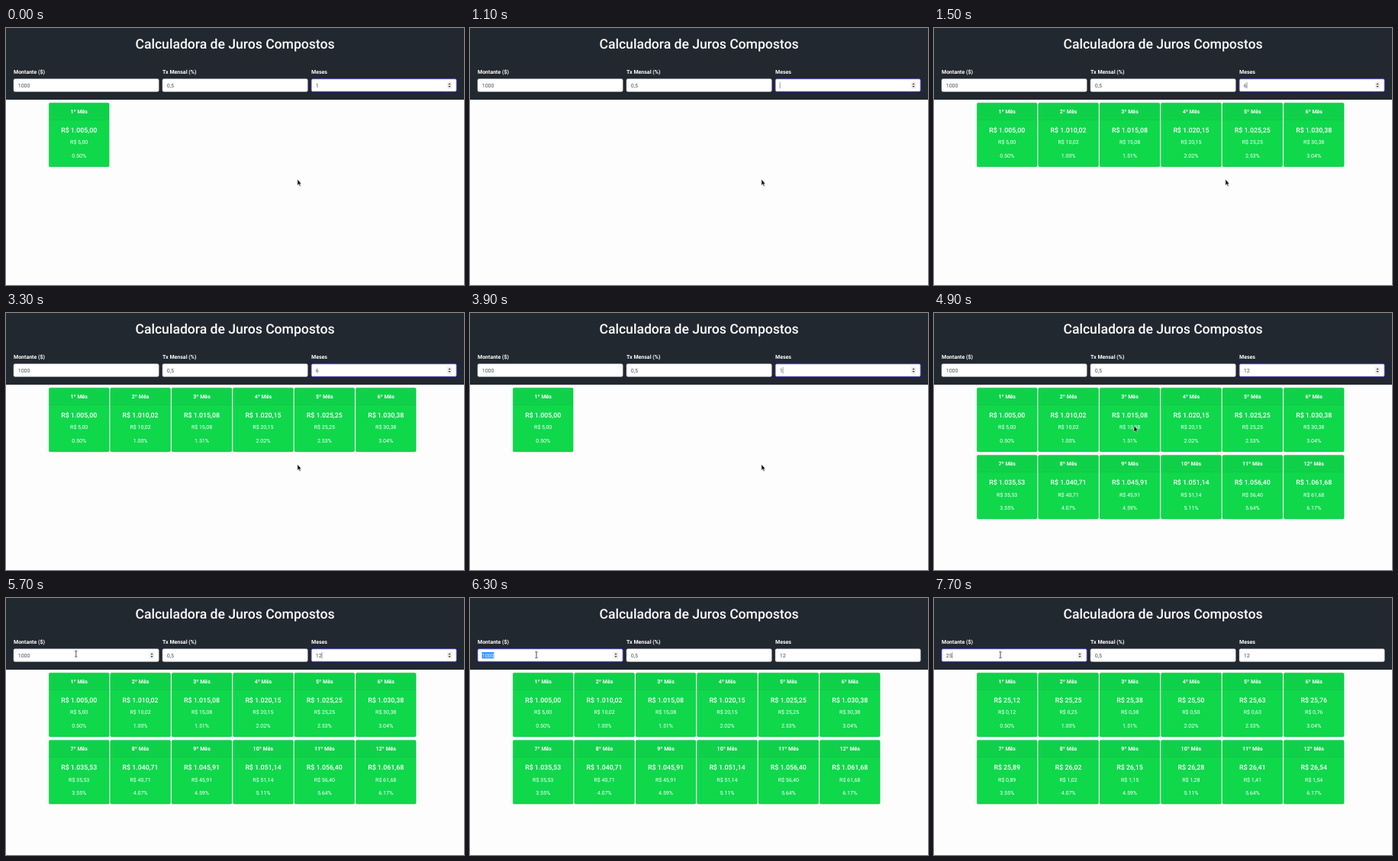
An HTML page for the animation above (8 s loop, 600 by 337 pixels).

```html
<!DOCTYPE html>
<html lang="pt-BR">
<head>
<meta charset="utf-8">
<title>Calculadora de Juros Compostos</title>
<style>
  html, body { margin: 0; width: 100%; height: 100%; overflow: hidden; background: #fdfdfd; }
  svg { display: block; width: 600px; height: 337px; }
  text { font: 7.03px Roboto, Arial, sans-serif; fill: #fff; text-rendering: geometricPrecision; }
  .title { font-size: 17.57px; font-weight: 500; }
  .bold { font-weight: 700; }
  .total { font-size: 8.79px; font-weight: 500; }
  .mid { text-anchor: middle; }
  .value { fill: #495057; }
  .box { fill: #fff; stroke: #ced4da; stroke-width: .44; }
  .ring { fill: none; stroke: #1d1470; stroke-width: 1.5; stroke-opacity: .55; }
  .edge { fill: none; stroke: #2b20a0; stroke-width: .7; }
  .caret { fill: #333; }
  .mark { fill: #3390ff; }
  .card { fill: #0fd84b; stroke: #0dbd42; stroke-width: .44; }
  .head { fill: #000; fill-opacity: .03; }
  .rule { fill: #000; fill-opacity: .11; }
</style>
</head>
<body>
<svg id="stage" viewBox="0 0 600 337">
  <rect width="600" height="337" fill="#fdfdfd"/>
  <rect width="600" height="94" fill="#212830"/>
  <text class="title mid" x="300" y="26.8">Calculadora de Juros Compostos</text>
</svg>
<script>
const LOOP = 8000;
const CARDS = 12;
const RATE = 0.005;
const stage = document.getElementById('stage');

// Each step overrides part of the state from its time on.
const steps = [
  { t: 0, amount: '1000', months: '1', focus: 2, caret: false, selected: false, x: 381.8, y: 198.4 },
  { t: 600, caret: true },
  { t: 1100, months: '' },
  { t: 1500, months: '6' },
  { t: 2100, caret: false },
  { t: 2700, caret: true },
  { t: 3300, caret: false },
  { t: 3500, months: '', caret: true },
  { t: 3900, months: '1' },
  { t: 4000, months: '12' },
  { t: 4600, caret: false },
  { t: 4900, x: 262, y: 148 },
  { t: 5000, x: 118, y: 80 },
  { t: 5200, x: 104, y: 77, caret: true },
  { t: 5300, x: 96, y: 74 },
  { t: 5400, x: 91.8, y: 73.2 },
  { t: 5800, x: 90, y: 74 },
  { t: 5900, focus: 0 },
  { t: 6000, x: 87, y: 74.6 },
  { t: 6100, selected: true, caret: false },
  { t: 7200, amount: '2', selected: false, caret: true },
  { t: 7700, amount: '25' }
];

function add(parent, tag, attrs, text) {
  const el = document.createElementNS('http://www.w3.org/2000/svg', tag);
  for (const key in attrs) el.setAttribute(key, attrs[key]);
  if (text) el.textContent = text;
  parent.appendChild(el);
  return el;
}

function show(el, on) {
  el.style.display = on ? '' : 'none';
}

function setText(el, text) {
  if (el.textContent !== text) el.textContent = text;
}

function makeField(label, x) {
  const g = add(stage, 'g', { transform: `translate(${x} 0)` });
  const frame = { x: 0, y: 66.7, width: 190.2, height: 16.7, rx: 1.76 };
  add(g, 'text', { class: 'bold', x: 0, y: 60.2 }, label);
  const ring = add(g, 'g', {});
  add(ring, 'rect', { ...frame, x: -.7, y: 66, width: 191.6, height: 18.1, rx: 2.4, class: 'ring' });
  add(g, 'rect', { ...frame, class: 'box' });
  const edge = add(g, 'rect', { ...frame, class: 'edge' });
  const mark = add(g, 'rect', { class: 'mark', x: 5.6, y: 71, height: 8.3 });
  const value = add(g, 'text', { class: 'value', x: 5.7, y: 77.6 });
  const caret = add(g, 'rect', { class: 'caret', y: 71, width: .5, height: 8.3 });
  const spin = add(g, 'g', {});
  add(spin, 'rect', { x: 177.8, y: 70.4, width: 6.4, height: 9.4, fill: '#efefef' });
  add(spin, 'path', { d: 'M179.3 74.2l1.7-2l1.7 2zM179.3 76.1h3.4l-1.7 2z', fill: '#444' });
  return { ring, edge, mark, value, caret, spin };
}

function makeCard(i) {
  const x = 56.3 + (i % 6) * 80.4;
  const y = 98.2 + Math.floor(i / 6) * 88.2;
  const g = add(stage, 'g', { transform: `translate(${x} ${y})` });
  const line = (cls, at, text) => add(g, 'text', { class: `mid ${cls}`, x: 39.4, y: at }, text);
  add(g, 'rect', { class: 'card', width: 78.8, height: 83.7, rx: 1.7 });
  add(g, 'rect', { class: 'head', width: 78.8, height: 22 });
  add(g, 'rect', { class: 'rule', y: 21.8, width: 78.8, height: .5 });
  line('bold', 13.4, `${i + 1}º Mês`);
  return { g, total: line('total', 39.1), gain: line('', 54.2), percent: line('', 71.7) };
}

// The tiny offset keeps exact half cents rounding down.
const fixed = v => (v - 1e-9).toFixed(2);
const money = v => 'R$ ' + fixed(v).replace('.', ',').replace(/\B(?=(\d{3})+,)/g, '.');

const fields = [['Montante ($)', 10], ['Tx Mensal (%)', 205], ['Meses', 400]]
  .map(([label, x]) => makeField(label, x));
const cards = Array.from({ length: CARDS }, (_, i) => makeCard(i));
const arrow = add(stage, 'path', {
  d: 'M0 0V8L1.8 6.4L3 9L4.3 8.4L3.1 5.8H5.3Z',
  fill: '#111', stroke: '#fff', 'stroke-width': .5, 'stroke-linejoin': 'round'
});
const beam = add(stage, 'path', {
  d: 'M-1.6-3.9H-.5L0-3.5L.5-3.9H1.6M0-3.5V3.5M-1.6 3.9H-.5L0 3.5L.5 3.9H1.6',
  fill: 'none', stroke: '#222', 'stroke-width': .8
});

function render(s) {
  const inField = s.x < 200 && s.y > 66 && s.y < 84;
  const values = [s.amount, '0,5', s.months];
  fields.forEach((f, i) => {
    const focused = i === s.focus;
    setText(f.value, values[i]);
    const width = values[i] ? f.value.getComputedTextLength() : 0;
    const selected = focused && s.selected;
    show(f.ring, focused);
    show(f.edge, focused);
    show(f.mark, selected);
    show(f.caret, focused && s.caret);
    show(f.spin, focused || (i === 0 && inField));
    f.mark.setAttribute('width', width);
    f.caret.setAttribute('x', 5.8 + width);
    f.value.style.fill = selected ? '#fff' : '';
  });

  const amount = Number(s.amount);
  cards.forEach((c, i) => {
    const growth = Math.pow(1 + RATE, i + 1) - 1;
    show(c.g, i < Number(s.months));
    setText(c.total, money(amount * (1 + growth)));
    setText(c.gain, money(amount * growth));
    setText(c.percent, fixed(growth * 100) + '%');
  });

  show(arrow, !inField);
  show(beam, inField);
  (inField ? beam : arrow).setAttribute('transform', `translate(${s.x} ${s.y})`);
}

const start = performance.now();
function tick(now) {
  const t = Math.max(0, now - start) % LOOP;
  render(Object.assign({}, ...steps.filter(s => s.t <= t)));
  requestAnimationFrame(tick);
}
tick(start);
</script>
</body>
</html>
```
